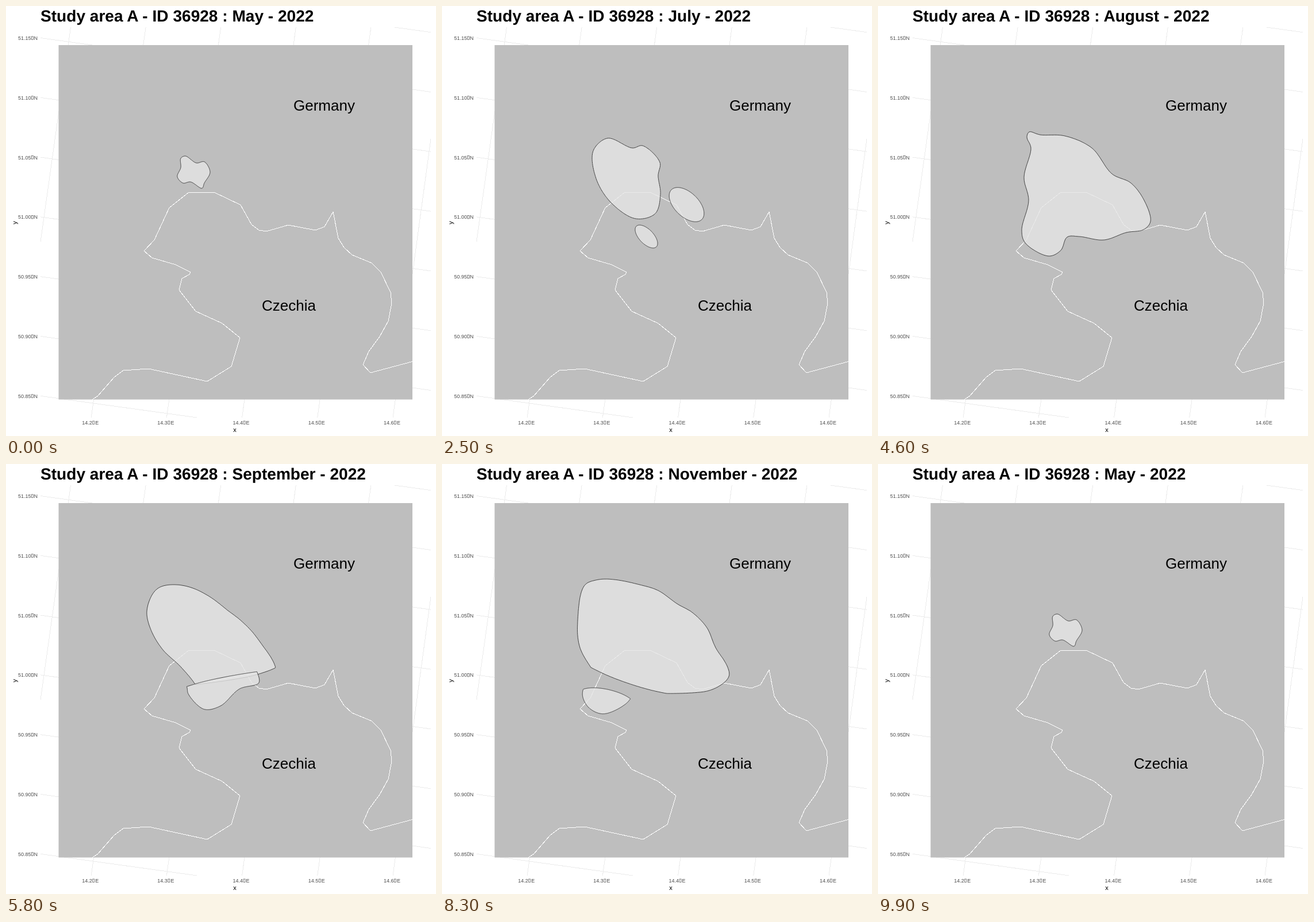
An HTML page for the animation above (10000 ms loop, 748 px wide and 748 px high).

```html
<!DOCTYPE html>
<html lang="en">
<head>
<meta charset="utf-8">
<title>Study area</title>
<style>
  html, body { margin: 0; width: 100%; height: 100%; overflow: hidden; background: #fff; }
  svg { display: block; width: 748px; height: 748px; font-family: "Liberation Sans", Arial, sans-serif; }
  #grid, #border { fill: none; stroke: #ebebeb; shape-rendering: crispEdges; }
  #border { stroke: #fff; }
  #areas path { fill: #e5e5e5; fill-opacity: .8; stroke: #333; stroke-width: .9; }
  #axis { font-size: 9px; fill: #4d4d4d; text-anchor: end; }
  #axis rect { fill: none; stroke: #4d4d4d; stroke-width: .7; }
  .country { font-size: 26px; text-anchor: middle; }
  .name { font-size: 11px; text-anchor: middle; }
  #title { font-size: 28.08px; font-weight: bold; text-rendering: geometricPrecision; }
</style>
</head>
<body>
<svg viewBox="0 0 748 748">
  <clipPath id="panel"><rect x="60" y="37" width="679" height="679"/></clipPath>
  <path id="grid" clip-path="url(#panel)"/>
  <rect x="91.5" y="68" width="615.5" height="616.5" fill="#bebebe"/>
  <path id="border" d="M150 684.5L160 678 188 646 204 634 248 631 350 653 392 627 407 577 376 552 330 531
    301 494 306 474 319 467 321 463 295 450 254 438 240 426 258 407 284 351 318 324 362 324 408 346
    427 380 440 390 453 392 491 381 538 390 554 384 569 358 578 404 588 420 602 433 636 447
    652 463 669 498 671 517 665 548 650 575 631 601 621 624 634 638 707 618.5"/>
  <g id="areas"></g>
  <text class="country" x="553.5" y="182">Germany</text>
  <text class="country" x="492" y="530">Czechia</text>
  <g id="axis"></g>
  <text class="name" x="398" y="741">x</text>
  <text class="name" transform="translate(19 377) rotate(-90)">y</text>
  <text id="title" x="60" y="27"></text>
</svg>
<script>
const $ = id => document.getElementById(id);
const SAMPLES = 300;

// --- Geometry helpers: a shape is a list of [x, y] ---

const lerp = (a, b, f) => [a[0] + (b[0] - a[0]) * f, a[1] + (b[1] - a[1]) * f];
const mix = (from, to, f) => from.map((p, i) => lerp(p, to[i], f));
const gap = (a, b) => Math.hypot(b[0] - a[0], b[1] - a[1]);

// Evenly spaced points along a closed polygon
function resample(poly) {
  const ring = [...poly, poly[0]];
  const lengths = poly.map((p, i) => gap(p, ring[i + 1]));
  const step = lengths.reduce((a, b) => a + b) / SAMPLES;
  const out = [];
  let i = 0, passed = 0;
  for (let k = 0; k < SAMPLES; k++) {
    while (i < poly.length - 1 && passed + lengths[i] < k * step) passed += lengths[i++];
    out.push(lerp(ring[i], ring[i + 1], lengths[i] ? (k * step - passed) / lengths[i] : 0));
  }
  return out;
}

// Closed centripetal Catmull-Rom curve through a few key points
function blob(text) {
  const pts = text.trim().split(/\s+/).map(p => p.split(",").map(Number));
  const at = i => pts[(i + pts.length) % pts.length];
  const tangent = i => {
    const [a, b, c] = [at(i - 1), at(i), at(i + 1)];
    const before = Math.sqrt(gap(a, b)), after = Math.sqrt(gap(b, c));
    return [0, 1].map(k => (b[k] - a[k]) / before - (c[k] - a[k]) / (before + after) + (c[k] - b[k]) / after);
  };
  const curve = [];
  pts.forEach((p, i) => {
    const q = at(i + 1), m = tangent(i), n = tangent(i + 1), scale = Math.sqrt(gap(p, q));
    for (let u = 0; u < 1; u += 1 / 16) {
      const v = 1 - u;
      curve.push([0, 1].map(k => v * v * (1 + 2 * u) * p[k] + u * u * (1 + 2 * v) * q[k] +
        scale * u * v * (v * m[k] - u * n[k])));
    }
  });
  return resample(curve);
}

function ellipse(cx, cy, a, b, degrees) {
  const turn = degrees * Math.PI / 180;
  return resample(Array.from({ length: SAMPLES }, (_, i) => {
    const angle = 2 * Math.PI * i / SAMPLES, x = a * Math.cos(angle), y = b * Math.sin(angle);
    return [cx + x * Math.cos(turn) - y * Math.sin(turn), cy + x * Math.sin(turn) + y * Math.cos(turn)];
  }));
}

// The part of a shape between two fractions of its length
function cut(shape, from, to) {
  const part = [];
  for (let i = Math.round(from * SAMPLES); i <= Math.round(to * SAMPLES); i++) part.push(shape[i % SAMPLES]);
  return resample(part);
}

function cutInThree(shape) {
  const rest = cut(shape, .48, 1.26);
  return [cut(rest, .25, 1), cut(shape, .26, .48), cut(rest, 0, .25)];
}

// Rotate the point order of `to` to lie closest to `from`
function align(from, to) {
  let best = Infinity, shift = 0;
  for (let s = 0; s < SAMPLES; s++) {
    const sum = from.reduce((total, [x, y], i) => {
      const q = to[(i + s) % SAMPLES];
      return total + (x - q[0]) ** 2 + (y - q[1]) ** 2;
    }, 0);
    if (sum < best) { best = sum; shift = s; }
  }
  return [...to.slice(shift), ...to.slice(0, shift)];
}

const pairs = (from, to) => from.map((shape, i) => [shape, align(shape, to[i])]);

// Morph whose first of `steps` steps looks like `pose`
function pairThrough(pose, to, steps) {
  const end = align(pose, to);
  return [mix(pose, end, -1 / (steps - 1)), end];
}

const stretch = (shape, [cx, cy], kx, ky) =>
  shape.map(([x, y]) => [cx + (x - cx) * kx, cy + (y - cy) * ky]);

// --- Monthly areas ---

const may = blob("312,261 331,273 345,271 355,289 345,308 341,317 321,306 308,308 298,297 304,281 304,265");
const july = [
  blob("288,230 331,247 349,243 379,272 376,295 380,327 371,361 337,370 294,342 268,300 263,252"),
  ellipse(425.5, 345.5, 37, 21, 44),
  ellipse(355.5, 401, 25, 12.5, 46)
];
const june = mix(may, align(may, july[0]), .6);
const september = blob(`328,383 307,350 277,318 249,260 268,219 292,211 328,218 387,264 450,327 463,352
  466,374 427,383 392,418 361,426 331,397`);
const autumn = blob(`270,203 345,214 380,219 415,237 445,248 468,275 475,318 498,368 470,398 430,404
  362,393 280,356 239,318 235,262 245,208`);
const islet = ellipse(278, 413.5, 29.8, 19.3, 18);
const [october, november] = [1, -1].map(sign => [
  stretch(autumn, [498, 300], 1 + sign * .042, 1),
  stretch(islet, [278, 413], 1 + sign * .1, 1 + sign * .1)
]);
const leavingAugust = pairThrough(blob(`263,219 282,224 325,226 372,247 407,292 440,308 464,340 474,375
  462,389 432,394 393,407 350,401 329,402 318,425 297,435 256,412 250,390 262,338 254,298 266,247
  259,228`), september, 5);
const leavingDecember = pairThrough(blob(`291,203 338,218 400,277 445,311 475,338 478,360 455,370 415,373
  345,391 291,420 259,408 242,378 240,345 231,290 241,232 263,208`), may, 6);
const august = leavingAugust[0], december = leavingDecember[0];

// `start` is the tick of 100 ms at which a month begins to morph into the next
const months = [
  { name: "May", start: 7, shapes: [may], morph: pairs([may], [june]) },
  { name: "June", start: 20, shapes: [june], morph: pairs(cutInThree(june), july) },
  { name: "July", start: 33, shapes: july, morph: pairs(july, cutInThree(august)) },
  { name: "August", start: 46, steps: 5, shapes: [august], morph: [leavingAugust] },
  { name: "September", start: 58, shapes: [september],
    morph: pairs([cut(september, 0, .69), cut(september, .69, 1)], october) },
  { name: "October", start: 70, shapes: october, morph: pairs(october, november) },
  { name: "November", start: 82, shapes: november,
    morph: pairs(november, [cut(december, .74, 1.5), cut(december, .5, .74)]) },
  { name: "December", start: 94, shapes: [december], morph: [leavingDecember] }
];

// --- Fixed axes and grid ---

function axisLabel(x, y, number, letter) {
  return `<text x="${x - 11.5}" y="${y}">${number}</text><text x="${x}" y="${y}">${letter}</text>
    <rect x="${x - 10.5}" y="${y - 6}" width="3" height="5.5"/>`;
}

let grid = "", labels = "";
for (let i = -1; i < 7; i++) {
  const y = 55.5 + 103.8 * i;
  grid += `M60 ${y}L739 ${y + 94}`;
  if (i >= 0) labels += axisLabel(55, y + 3.5, (51.15 - i * .05).toFixed(2), "N");
}
for (let i = 0; i < 6; i++) {
  grid += `M${112.5 + 130.6 * i} 37L${17 + 131.2 * i} 716`;
  if (i) labels += axisLabel(30 + 131.2 * i, 728, (14.1 + i * .1).toFixed(1), "E");
}
$("grid").setAttribute("d", grid);
$("axis").innerHTML = labels;

// --- Animation ---

const toPath = shape => `<path d="M${shape.map(p => p.map(v => v.toFixed(1))).join("L")}Z"/>`;
let shown = -1;

function draw() {
  const tick = Math.floor(performance.now() % 10000 / 100);
  if (tick !== shown) {
    shown = tick;
    const index = Math.max(0, months.filter(m => m.start <= tick).length - 1);
    const month = months[index], next = months[(index + 1) % months.length];
    const f = Math.max(0, Math.min(1, (tick - month.start + 1) / (month.steps || 6)));
    const shapes = f === 0 ? month.shapes : f === 1 ? next.shapes
      : month.morph.map(([from, to]) => mix(from, to, f));
    $("areas").innerHTML = shapes.map(toPath).join("");
    $("title").textContent = `Study area A - ID 36928 : ${(f > .5 ? next : month).name} - 2022`;
  }
  requestAnimationFrame(draw);
}
draw();
</script>
</body>
</html>
```
